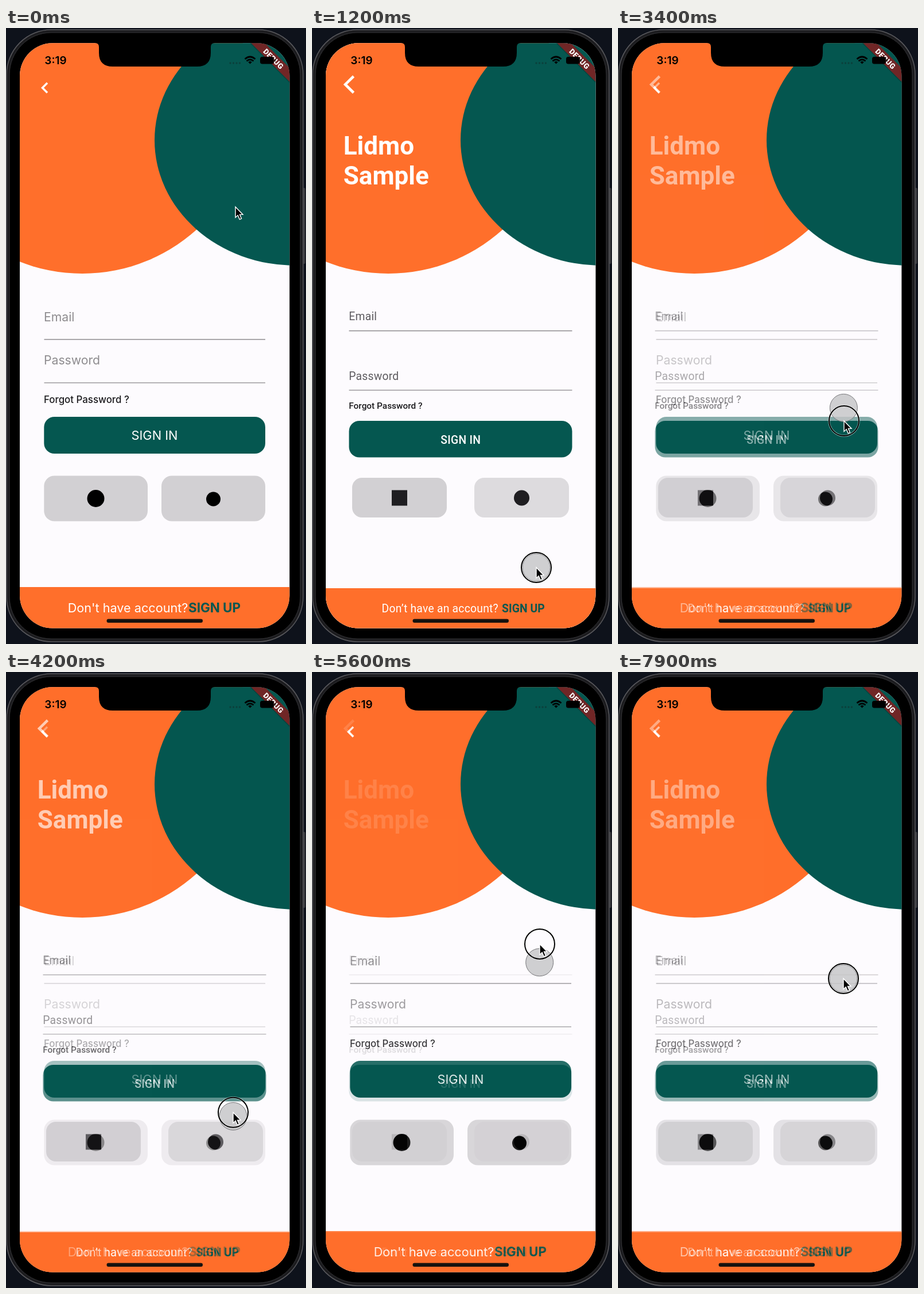
An HTML page for the animation above (8000 ms loop, 523x1071 px).

```html
<!DOCTYPE html>
<html lang="en">
<head>
<meta charset="utf-8">
<title>Sign-in overlay</title>
<style>
  html, body { margin: 0; width: 100%; height: 100%; overflow: hidden; background: #0e121b; }
  svg { display: block; width: 523px; height: 1071px; }
  .inter { font-family: Inter, sans-serif; }
  .roboto { font-family: Roboto, sans-serif; }
  .teal { fill: #055750; }
  .orange { fill: #ff6f2b; }
  .white { fill: #fff; }
  .mid { text-anchor: middle; }
  .chevron { fill: none; stroke: #fff; }
  .rule { stroke: #8b898c; stroke-width: 1.3; }
</style>
</head>
<body>
<svg viewBox="0 0 523 1071">
  <defs>
    <clipPath id="screen"><rect x="24" y="26.300" width="470.300" height="1017.200" rx="57"/></clipPath>
    <g id="backdrop">
      <rect x="24" y="26" width="471" height="1018" fill="#fdfbfe"/>
      <circle class="orange" cx="133" cy="129" r="298"/>
      <ellipse class="teal" cx="504.500" cy="195" rx="245.500" ry="218"/>
    </g>
  </defs>

  <!-- phone body -->
  <rect x="517" y="278" width="5" height="132" rx="2" fill="#35363a"/>
  <rect x="1" y="3" width="517" height="1064" rx="78" fill="#1c1c1f" stroke="#5a5a5e" stroke-width="1.5"/>
  <rect x="6" y="8" width="507" height="1054" rx="73" stroke="#343437"/>

  <g clip-path="url(#screen)">
    <g class="inter" font-size="21.200">
      <use href="#backdrop"/>
      <path class="chevron" d="M72 95.500 63.500 104 72 112.500" stroke-width="3.500"/>
      <g fill="#8e8c8f">
        <text x="66" y="510">Email</text>
        <text x="66" y="585">Password</text>
      </g>
      <path class="rule" d="M66.500 541.500H452M66.500 616.800H452"/>
      <text x="66" y="652" font-size="16.850" font-weight="500" fill="#1c1b1e">Forgot Password ?</text>
      <rect class="teal" x="66.300" y="676" width="385.700" height="64" rx="18"/>
      <text class="white mid" x="259" y="715.700" font-size="21.800">SIGN IN</text>
      <g fill="#d2d0d3">
        <rect x="66.300" y="778.500" width="180.700" height="79" rx="18"/>
        <rect x="271" y="778.500" width="181" height="79" rx="18"/>
      </g>
      <circle cx="156.500" cy="818" r="15"/>
      <circle cx="361.500" cy="819" r="12.500"/>
      <rect class="orange" x="24" y="972" width="471" height="72"/>
      <text class="white" x="107.700" y="1015.700" font-size="21.650">Don't have account?</text>
      <text class="teal" x="318" y="1015.700" font-size="22.400" font-weight="700">SIGN UP</text>
    </g>

    <g id="overlay" class="roboto" font-size="19.300">
      <use href="#backdrop"/>
      <path class="chevron" d="M72.500 84 58 98.200 72.500 112.500" stroke-width="4.600"/>
      <g class="white" font-size="44" font-weight="700">
        <text x="54.800" y="220">Lidmo</text>
        <text x="54.800" y="271.500">Sample</text>
      </g>
      <g fill="#5d5b5f" letter-spacing=".25">
        <text x="64.300" y="508.300">Email</text>
        <text x="64.300" y="611.500">Password</text>
      </g>
      <path class="rule" d="M64.500 526.500H453.500M64.500 629.700H453.500"/>
      <text x="64.300" y="662" font-size="15.400" font-weight="500" fill="#1c1b1e">Forgot Password ?</text>
      <rect class="teal" x="64.500" y="683" width="389" height="63.500" rx="18"/>
      <text class="white mid" x="259.300" y="722.500" font-weight="500" letter-spacing=".3">SIGN IN</text>
      <rect x="70" y="782" width="165" height="69" rx="17" fill="#d2d0d3"/>
      <rect x="283" y="782" width="165" height="69" rx="17" fill="#dddbde"/>
      <rect x="139" y="803.500" width="27" height="27" fill="#1f1e21"/>
      <circle cx="365.500" cy="817" r="13.500" fill="#1f1e21"/>
      <rect class="orange" x="24" y="974" width="471" height="70"/>
      <text class="white" x="121.500" y="1016" letter-spacing=".25">Don’t have an account?</text>
      <text class="teal" x="331" y="1016" font-weight="700" letter-spacing=".1">SIGN UP</text>
    </g>

    <!-- debug ribbon and status bar -->
    <g transform="translate(466.500 53.500) rotate(45)">
      <rect x="-60" y="-8.500" width="120" height="18.500" fill="#000" opacity=".2"/>
      <rect x="-60" y="-8.500" width="120" height="17" fill="#702626"/>
      <text class="roboto white mid" y="5" font-size="13" font-weight="900" letter-spacing=".5">DEBUG</text>
    </g>
    <text class="inter" x="67.300" y="63" font-size="19" font-weight="600">3:19</text>
    <g fill="#0b403c">
      <circle cx="391" cy="61" r="1.700"/><circle cx="396.500" cy="61" r="1.700"/>
      <circle cx="402" cy="61" r="1.700"/><circle cx="407.500" cy="61" r="1.700"/>
    </g>
    <g fill="none" stroke="#000" stroke-width="2.700">
      <path d="M416.500 54Q425.500 46 434.500 54M419.500 57.500Q425.500 52.200 431.500 57.500"/>
      <path d="M422.300 59.300Q425.500 56.800 428.700 59.300L425.500 62.600Z" fill="#000" stroke="none"/>
    </g>
    <rect x="443" y="50" width="24" height="12.500" rx="3.800"/>
    <rect x="468" y="54" width="1.700" height="4.500" rx=".8"/>
    <rect x="175.500" y="1027.500" width="167.500" height="6.500" rx="3.250" fill="#16120f"/>
  </g>
  <path d="M155 24V26Q162 26 162 33V43Q162 67 186 67H333Q357 67 357 43V33Q357 26 364 26V24Z"/>

  <!-- touch disc, pointer ring and arrow -->
  <circle id="disc" r="24" fill="#c5c5c7" fill-opacity=".81" stroke="#77777a"/>
  <g id="pointer">
    <g id="ring" fill="none">
      <circle r="26" stroke="#fff" stroke-opacity=".5" stroke-width="3.600"/>
      <circle r="26" stroke="#000" stroke-width="2"/>
    </g>
    <path d="M0 0V18.500L4.200 14.600 7.300 21.800 10.500 20.400 7.500 13.400H13Z" stroke="#fff" stroke-width="1.400"/>
  </g>
</svg>
<script>
const LOOP = 8000, STEP = 100, DISC_LAG = 60, PRESS = 250;
const el = id => document.getElementById(id);

// time, pointer x, pointer y, overlay opacity
const keys = [
  [0, 400, 311, 0], [250, 398, 331, 0], [1000, 391, 938, 1], [1400, 391, 938, 1],
  [1900, 385, 620, .41], [2200, 384, 601, .37], [2500, 385, 600, .37], [2800, 387, 560, .3],
  [3100, 390, 570, .32], [3400, 394, 683, .52], [3700, 395, 770, .68], [4000, 396, 780, .68],
  [4500, 396, 725, .56], [4900, 396, 685, .49], [5300, 396, 615, .35], [5900, 398, 340, 0],
  [6300, 398, 331, 0], [7100, 398, 331, 0], [7600, 393, 533, .41], [8000, 393, 533, .41]
];

const slope = (i, c) => (keys[i + 1][c] - keys[i][c]) / (keys[i + 1][0] - keys[i][0]);

// Smooth speed through a key, at rest where the direction turns
function tangent(i, c) {
  if (i === 0 || i === keys.length - 1) return 0;
  if (slope(i - 1, c) * slope(i, c) <= 0) return 0;
  return (keys[i + 1][c] - keys[i - 1][c]) / (keys[i + 1][0] - keys[i - 1][0]);
}

function sample(t, c) {
  let i = 0;
  while (i < keys.length - 2 && t >= keys[i + 1][0]) i++;
  const [a, b] = [keys[i], keys[i + 1]], d = b[0] - a[0];
  const u = Math.max(0, t - a[0]) / d, v = 1 - u, ease = u * u * (3 - 2 * u);
  return a[c] + (b[c] - a[c]) * ease + d * u * v * (v * tangent(i, c) - u * tangent(i + 1, c));
}

function place(node, t) {
  node.setAttribute('transform', `translate(${sample(t, 1)} ${sample(t, 2)})`);
}

function draw(now) {
  const t = Math.floor(now % LOOP / STEP) * STEP;
  const pressed = t >= PRESS ? 'visible' : 'hidden';
  el('overlay').setAttribute('opacity', Math.min(1, Math.max(0, sample(t, 3))));
  place(el('pointer'), t);
  place(el('disc'), t - DISC_LAG);
  el('ring').setAttribute('visibility', pressed);
  el('disc').setAttribute('visibility', pressed);
}

const start = performance.now();
(function tick() {
  draw(performance.now() - start);
  requestAnimationFrame(tick);
})();
</script>
</body>
</html>
```
